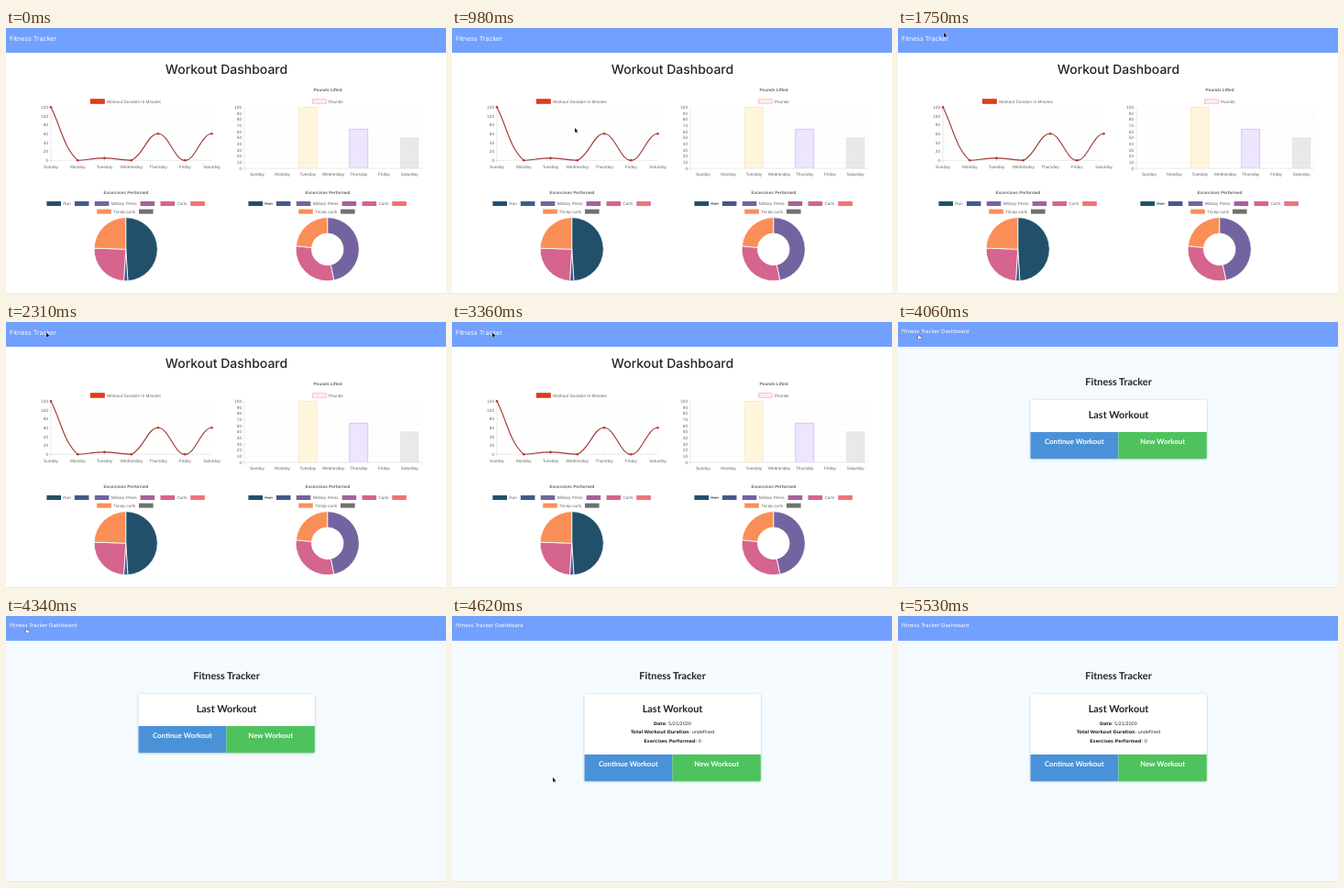
Animation, 480 px wide and 290 px high, one loop 5.6 s. Source, as an HTML page with a canvas:

```html
<!DOCTYPE html>
<html lang="en">
<head>
<meta charset="utf-8">
<title>Workout Dashboard</title>
<style>
  html, body { margin: 0; width: 100%; height: 100%; overflow: hidden; background: #fff; }
  canvas { display: block; width: 480px; height: 290px; }
</style>
</head>
<body>
<canvas id="stage"></canvas>
<script>
const W = 480, H = 290, LOOP = 5600, STEP = 70;
const canvas = document.getElementById('stage');
const ctx = canvas.getContext('2d');
const ratio = window.devicePixelRatio || 1;
canvas.width = W * ratio;
canvas.height = H * ratio;

const CHART = 'px "Liberation Sans", sans-serif';
const UI = 'px Inter, sans-serif';
const LATO = 'px Lato, sans-serif';
const BODY = 'px "DejaVu Sans", sans-serif';
const SMALL = 4.66, GREY = '#666', NAV = '#71a0ff', NAV_H = 27;
const DAYS = ['Sunday', 'Monday', 'Tuesday', 'Wednesday', 'Thursday', 'Friday', 'Saturday'];
// The eighth value lies past the axis and only shapes the end of the curve.
const MINUTES = [120, 0, 5, 0, 60, 0, 60, 0];
const NAVY = '#22506b', BLUE = '#455a8a', PURPLE = '#7364a0', PLUM = '#a6619c',
      PINK = '#d5648f', CORAL = '#ec747a', ORANGE = '#f98f56', SLATE = '#707072';

// Page changes and pointer path: [time, x, y]
const HOME_AT = 3430, DATA_AT = 4480, POINTER_FROM = 980, POINTER_TO = 5320;
const PATH = [
  [980, 134, 109], [1050, 98, 55], [1120, 68, 18], [1190, 52, 4],
  [1470, 52, 4], [1750, 50, 5], [2030, 48, 9], [2310, 44, 11.5],
  [3430, 44, 11.5], [3640, 22, 14], [4410, 22, 14], [4480, 28, 30],
  [4550, 80, 120], [4620, 110, 176], [4830, 110, 176],
  [4900, 160, 190], [4970, 225, 250], [5040, 259, 278], [5320, 259, 278]
];

function rect(x, y, w, h, fill) {
  ctx.fillStyle = fill;
  ctx.fillRect(x, y, w, h);
}

function line(x1, y1, x2, y2, color, width = 0.4) {
  ctx.strokeStyle = color;
  ctx.lineWidth = width;
  ctx.beginPath();
  ctx.moveTo(x1, y1);
  ctx.lineTo(x2, y2);
  ctx.stroke();
}

function text(str, x, y, font, fill, align = 'left') {
  ctx.font = font;
  ctx.fillStyle = fill;
  ctx.textAlign = align;
  ctx.fillText(str, x, y);
}

const label = (str, x, y, align) => text(str, x, y, SMALL + CHART, GREY, align);
const chartTitle = (str, x, y) => text(str, x, y, 'bold ' + SMALL + CHART, GREY, 'center');

function legend(items, x, y) {
  const box = 15.6;
  for (const [name, fill, border, struck] of items) {
    rect(x, y, box, 5, fill);
    if (border) {
      ctx.strokeStyle = border;
      ctx.lineWidth = 0.6;
      ctx.strokeRect(x + 0.3, y + 0.3, box - 0.6, 4.4);
    }
    x += box + 2.3;
    label(name, x, y + 4.2);
    const w = ctx.measureText(name).width;
    if (struck) line(x, y + 2.6, x + w, y + 2.6, GREY, 0.7);
    x += w + 4;
  }
}

function grid(left, right, top, bottom, max, step, xs) {
  const faint = 'rgba(0,0,0,.045)';
  for (let v = 0; v <= max; v += step) {
    const y = bottom - (bottom - top) * v / max;
    line(left - 3, y, right, y, v ? faint : 'rgba(0,0,0,.22)');
    label(String(v), left - 3, y + 1.7, 'right');
  }
  xs.forEach(x => line(x, top, x, bottom + 3, faint));
  line(left, top, left, bottom + 3, 'rgba(0,0,0,.2)');
}

function lineChart() {
  const left = 49, right = 224.5, top = 86.2, bottom = 144.3, gap = (right - left) / 6;
  const pts = MINUTES.map((v, i) => ({ x: left + i * gap, y: bottom - (bottom - top) * v / 120 }));
  const shown = pts.slice(0, DAYS.length);
  legend([['Workout Duration In Minutes', '#e53b16', '#c33320']], 92, 77.5);
  grid(left, right, top, bottom, 120, 20, shown.map(p => p.x));
  DAYS.forEach((d, i) => label(d, pts[i].x, 152.6, 'center'));

  const clamp = y => Math.max(top, Math.min(bottom, y));
  const handles = shown.map((p, i) => {
    const a = pts[i - 1] || p, b = pts[i + 1];
    const before = Math.hypot(p.x - a.x, p.y - a.y), after = Math.hypot(b.x - p.x, b.y - p.y);
    const f = 0.4 * before / (before + after), g = 0.4 * after / (before + after);
    return {
      inX: p.x - f * (b.x - a.x), inY: clamp(p.y - f * (b.y - a.y)),
      outX: p.x + g * (b.x - a.x), outY: clamp(p.y + g * (b.y - a.y))
    };
  });
  ctx.strokeStyle = '#a03c33';
  ctx.lineWidth = 1.15;
  ctx.beginPath();
  ctx.moveTo(pts[0].x, pts[0].y);
  for (let i = 1; i < shown.length; i++) {
    const h = handles[i - 1], k = handles[i];
    ctx.bezierCurveTo(h.outX, h.outY, k.inX, k.inY, pts[i].x, pts[i].y);
  }
  ctx.stroke();
  for (const p of shown) {
    ctx.fillStyle = '#c5301f';
    ctx.beginPath();
    ctx.arc(p.x, p.y, 1.3, 0, 7);
    ctx.fill();
  }
}

function barChart() {
  const left = 260, right = 454, top = 86.3, bottom = 153, gap = (right - left) / 7;
  const center = i => left + (i + 0.5) * gap;
  chartTitle('Pounds Lifted', 351, 69.1);
  legend([['Pounds', 'rgba(255,99,132,.12)', 'rgba(235,110,130,.6)']], 334, 77.5);
  grid(left, right, top, bottom, 100, 10, DAYS.map((d, i) => left + (i + 1) * gap));
  DAYS.forEach((d, i) => label(d, center(i), 161.2, 'center'));
  const bars = [
    [2, 100, 'rgba(255,206,86,.2)', 'rgba(245,205,110,.6)'],
    [4, 64, 'rgba(153,102,255,.17)', 'rgba(153,112,235,.7)'],
    [6, 50, 'rgba(0,0,0,.085)', 'rgba(0,0,0,.07)']
  ];
  for (const [i, value, fill, border] of bars) {
    const h = (bottom - top) * value / 100, x = center(i) - 10;
    rect(x, bottom - h, 20, h, fill);
    ctx.strokeStyle = border;
    ctx.lineWidth = 0.5;
    ctx.beginPath();
    ctx.moveTo(x, bottom);
    ctx.lineTo(x, bottom - h);
    ctx.lineTo(x + 20, bottom - h);
    ctx.lineTo(x + 20, bottom);
    ctx.stroke();
  }
}

function roundChart(cx, slices, inner, struck) {
  chartTitle('Excercises Performed', cx, 180.5);
  legend([['Run', NAVY, '', struck], ['', BLUE], ['Military Press', PURPLE],
          ['', PLUM], ['Curls', PINK], ['', CORAL]], cx - 86.6, 189);
  legend([['Tricep curls', ORANGE], ['', SLATE]], cx - 31.8, 197.6);
  const total = slices.reduce((sum, s) => sum + s[0], 0);
  const x = cx - 0.3, y = 241.2;
  let a = -Math.PI / 2;
  for (const [value, fill] of slices) {
    const b = a + value / total * Math.PI * 2;
    ctx.beginPath();
    ctx.arc(x, y, 34.6, a, b);
    if (inner) ctx.arc(x, y, inner, b, a, true);
    else ctx.lineTo(x, y);
    ctx.closePath();
    ctx.fillStyle = fill;
    ctx.fill();
    ctx.strokeStyle = '#fff';
    ctx.lineWidth = 0.8;
    ctx.stroke();
    a = b;
  }
}

function dashboard() {
  rect(0, 0, W, H, '#fff');
  rect(0, 0, W, NAV_H, NAV);
  text('Fitness Tracker', 4, 13.8, 7 + UI, '#fff');
  text('Workout Dashboard', 240.5, 49.6, '500 ' + 14 + UI, '#212529', 'center');
  lineChart();
  barChart();
  roundChart(131, [[120, NAVY], [5, BLUE], [60, PINK], [60, ORANGE]], 0, false);
  roundChart(351, [[100, PURPLE], [64, PINK], [50, ORANGE]], 17.3, true);
}

function detail(name, value, y) {
  const bold = 'bold 4.85' + BODY, plain = 4.85 + BODY;
  ctx.font = bold;
  const w = ctx.measureText(name).width;
  ctx.font = plain;
  const x = 240.5 - (w + ctx.measureText(value).width) / 2;
  text(name, x, y, bold, '#222');
  text(value, x + w, y, plain, '#222');
}

function home(loaded) {
  const ink = '#212429', split = loaded ? 151 : 120, x = 144.3, w = 192.6;
  rect(0, 0, W, H, '#f4fafd');
  rect(0, 0, W, NAV_H, NAV);
  text('Fitness Tracker Dashboard', 4, 12.2, 5.6 + BODY, '#fff');
  text('Fitness Tracker', 240.5, 68.9, 'bold ' + 10.9 + LATO, ink, 'center');

  ctx.save();
  ctx.shadowColor = 'rgba(60,80,90,.45)';
  ctx.shadowBlur = 2 * ratio;
  ctx.shadowOffsetY = 0.5 * ratio;
  ctx.fillStyle = '#fff';
  ctx.beginPath();
  ctx.roundRect(x, 85, w, split + 29 - 85, 1.6);
  ctx.fill();
  ctx.restore();
  ctx.save();
  ctx.clip();
  rect(x, split, 96.2, 29, '#4a92d8');
  rect(x + 96.2, split, w - 96.2, 29, '#4ec25d');
  ctx.restore();

  text('Last Workout', 240.5, 105.3, 'bold ' + 10.9 + LATO, ink, 'center');
  text('Continue Workout', 192.3, split + 12.7, 'bold ' + 7.8 + LATO, '#fff', 'center');
  text('New Workout', 288.7, split + 12.7, 'bold ' + 7.8 + LATO, '#fff', 'center');
  if (loaded) {
    detail('Date', ': 5/21/2020', 119);
    detail('Total Workout Duration', ': undefined', 128.3);
    detail('Exercises Performed', ': 0', 137.6);
  }
}

function pointerAt(t) {
  const i = PATH.findIndex(p => p[0] >= t);
  if (i < 1) return PATH[0].slice(1);
  const [t0, x0, y0] = PATH[i - 1], [t1, x1, y1] = PATH[i];
  const k = (t - t0) / (t1 - t0);
  return [x0 + (x1 - x0) * k, y0 + (y1 - y0) * k];
}

const arrow = new Path2D('M0 0V4.9L1.2 3.9L2 5.6L2.8 5.3L2 3.6H3.5Z');
const hand = new Path2D('M0 .4Q.6-.4 1.1.4V1.6L3.2 1.9Q3.7 2.1 3.5 2.8L3 4.4H.6L-1.1 2.6Q-1 2-.4 2.2L0 2.4Z');

function pointer(t) {
  const [x, y] = pointerAt(t);
  const isHand = t >= HOME_AT && t < DATA_AT;
  const shape = isHand ? hand : arrow;
  ctx.save();
  ctx.translate(x, y);
  ctx.lineJoin = 'round';
  ctx.strokeStyle = isHand ? '#222' : '#fff';
  ctx.lineWidth = isHand ? 0.8 : 0.5;
  ctx.stroke(shape);
  ctx.fillStyle = isHand ? '#fff' : '#111';
  ctx.fill(shape);
  ctx.restore();
}

function draw(now) {
  const t = Math.floor(now % LOOP / STEP) * STEP;
  ctx.setTransform(ratio, 0, 0, ratio, 0, 0);
  ctx.textRendering = 'geometricPrecision';
  if (t < HOME_AT) dashboard();
  else home(t >= DATA_AT);
  rect(0, 289.4, W, 0.6, '#d9dddf');
  if (t >= POINTER_FROM && t < POINTER_TO) pointer(t);
}

const start = performance.now();
function tick() {
  draw(performance.now() - start);
  requestAnimationFrame(tick);
}
tick();
</script>
</body>
</html>
```
